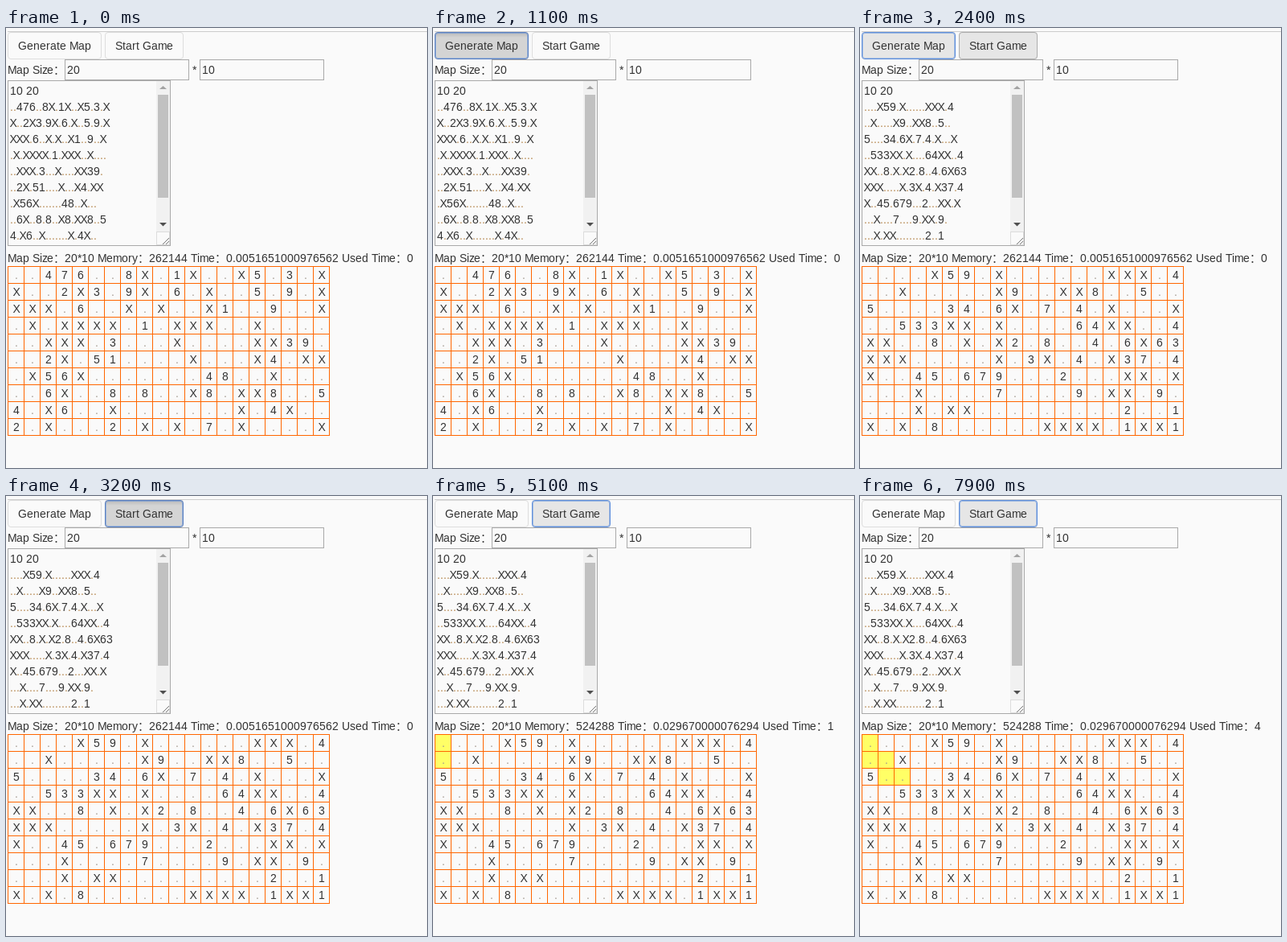
Write an HTML page with a canvas that moves like this. It is 524 by 547 pixels and loops after 8 s.

```html
<!DOCTYPE html>
<html lang="zh-CN">
<head>
<meta charset="utf-8">
<title>Map game</title>
<style>
html, body { margin: 0; width: 100%; height: 100%; overflow: hidden; background: #fafafa; }
canvas { display: block; }
</style>
</head>
<body>
<canvas id="stage" width="524" height="547"></canvas>
<script>
const LOOP = 8000;
const INK = '#333';
const ctx = document.getElementById('stage').getContext('2d');
ctx.font = '14px "Liberation Sans", Arial, "Noto Sans CJK SC", sans-serif';

const maps = [`
..476..8X.1X..X5.3.X
X..2X3.9X.6.X..5.9.X
XXX.6..X.X..X1..9..X
.X.XXXX.1.XXX..X....
..XXX.3...X....XX39.
..2X.51....X...X4.XX
.X56X.......48..X...
..6X..8.8..X8.XX8..5
4.X6..X.......X.4X..
2.X...2.X.X.7.X....X`, `
....X59.X......XXX.4
..X.....X9..XX8..5..
5....34.6X.7.4.X...X
..533XX.X....64XX..4
XX..8.X.X2.8..4.6X63
XXX.....X.3X.4.X37.4
X..45.679...2...XX.X
...X....7....9.XX.9.
...X.XX.........2..1
X.X.8......XXXX.1XX1`].map(m => m.trim().split('\n'));

// The hero's route: time, column, row
const steps = [[4200, 0, 0], [5100, 0, 1], [6000, 1, 1], [6900, 1, 2], [7900, 2, 2]];

// Whole-pixel advances, as in hinted text
const narrow = { M: 11, m: 11, X: 8, T: 8, z: 6 };
const advance = c => narrow[c] || Math.round(ctx.measureText(c).width);

function text(str, x, y, dot = INK) {
  for (const c of str) {
    const w = advance(c);
    ctx.fillStyle = c === '.' ? dot : INK;
    ctx.fillText(c, c === 'X' ? x - 0.5 : x, y);
    x += w;
  }
}

function rect(x, y, w, h, color) {
  ctx.fillStyle = color;
  ctx.fillRect(x, y, w, h);
}

function frame(x, y, w, h, color) {
  ctx.strokeStyle = color;
  ctx.lineWidth = 1;
  ctx.strokeRect(x + 0.5, y + 0.5, w - 1, h - 1);
}

function poly(points, color) {
  ctx.fillStyle = color;
  ctx.beginPath();
  points.forEach(p => ctx.lineTo(...p));
  ctx.fill();
}

function ring(x, y, w, h, r, color) {
  ctx.strokeStyle = color;
  ctx.lineWidth = 1;
  ctx.beginPath();
  ctx.roundRect(x + 0.5, y + 0.5, w - 1, h - 1, r);
  ctx.stroke();
}

const fills = { idle: '#fafafa', hover: '#e6e6e6', focus: '#e6e6e6', press: '#d4d4d4' };
const borders = { idle: '#ddd', hover: '#adadad', focus: '#5f8fdc', press: '#5a7fc0' };

function button(label, x, w, state) {
  const y = 5, h = 34;
  ctx.fillStyle = fills[state];
  ctx.beginPath();
  ctx.roundRect(x, y, w, h, 4);
  ctx.fill();
  if (state === 'press') {
    const shade = ctx.createLinearGradient(0, y, 0, y + 7);
    shade.addColorStop(0, 'rgba(0,0,0,.14)');
    shade.addColorStop(1, 'rgba(0,0,0,0)');
    rect(x + 1, y + 1, w - 2, 7, shade);
  }
  ring(x, y, w, h, 3.5, borders[state]);
  if (state === 'focus' || state === 'press') ring(x + 1, y + 1, w - 2, h - 2, 2.5, 'rgba(95,143,220,.5)');
  text(label, x + 13, 27);
}

function textarea(rows) {
  frame(2, 65, 203, 206, '#a9a9a9');
  ['10 20', ...rows.slice(0, 9)].forEach((row, i) => text(row, 5, 83 + i * 20, '#b5874f'));
  rect(187, 66, 17, 187, '#f1f1f1');
  rect(189, 83, 13, 128, '#c1c1c1');
  poly([[191, 76], [195.5, 72], [200, 76]], '#a3a3a3');
  poly([[191, 242], [195.5, 246.5], [200, 242]], '#505050');
  frame(187, 253, 17, 17, '#dcdcdc');
  ctx.strokeStyle = '#777';
  ctx.beginPath();
  for (const d of [8, 4]) {
    ctx.moveTo(203 - d, 269);
    ctx.lineTo(203, 269 - d);
  }
  ctx.stroke();
}

function grid(rows, t) {
  for (const [at, col, row] of steps)
    if (t >= at) rect(3 + col * 20, 297 + row * 21, 19, 20, '#ff6');
  for (let i = 0; i <= 20; i++) rect(2 + i * 20, 296, 1, 211, '#f60');
  for (let i = 0; i <= 10; i++) rect(2, 296 + i * 21, 401, 1, '#f60');
  rows.forEach((row, r) => [...row].forEach((c, i) =>
    text(c, (c === '.' ? 51 : 49) - 40 + i * 20, 312 + r * 21, '#a39a90')));
}

// Latest value whose time has come
const at = (t, list) => list.filter(e => t >= e[0]).pop()[1];

function draw(t) {
  rect(0, 0, 524, 547, '#fafafa');
  rect(2, 4, 522, 1, '#ccc');
  button('Generate Map', 2, 117, at(t, [[0, 'idle'], [500, 'hover'], [1100, 'press'], [1300, 'focus'], [3200, 'idle']]));
  button('Start Game', 123, 98, at(t, [[0, 'idle'], [2400, 'hover'], [3200, 'press'], [3300, 'focus']]));

  text('Map Size：', 2, 57);
  frame(73, 39, 155, 26, '#a9a9a9');
  text('20', 76, 57);
  text('*', 232, 57);
  frame(241, 39, 155, 26, '#a9a9a9');
  text('10', 244, 57);

  const rows = maps[t < 1300 ? 0 : 1];
  textarea(rows);
  const moved = steps.filter(s => t >= s[0]).length;
  const solved = t >= 3300;
  const used = !solved ? 0 : moved ? moved - 1 : '';
  const stats = solved ? 'Memory：524288 Time：0.029670000076294' : 'Memory：262144 Time：0.0051651000976562';
  text(`Map Size：20*10 ${stats} Used Time：${used}`, 2, 291);
  grid(rows, t);
}

const start = performance.now();
function tick() {
  draw((performance.now() - start) % LOOP);
  requestAnimationFrame(tick);
}
tick();
</script>
</body>
</html>
```
